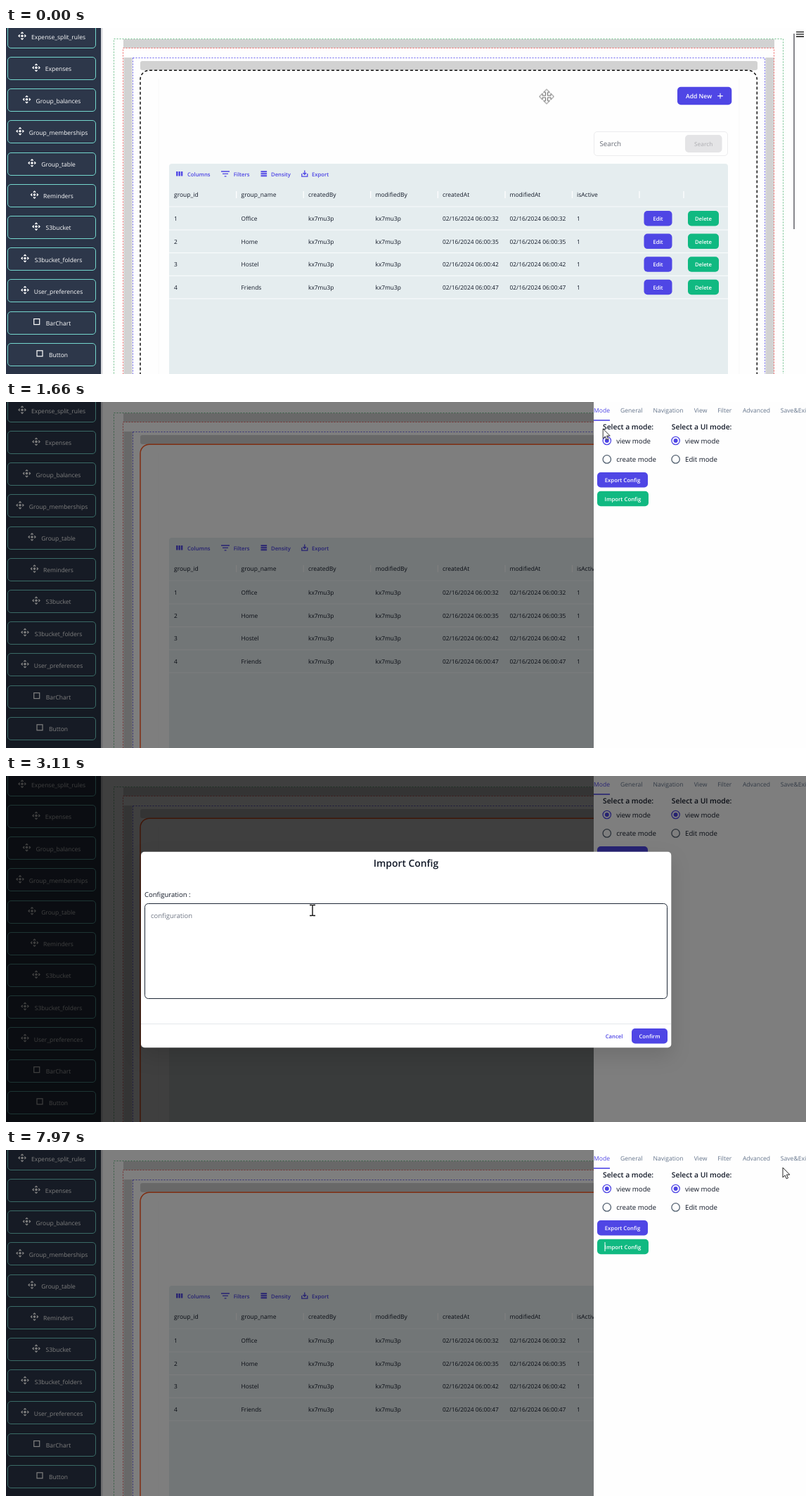
An HTML page that plays this animation: 1138x492 px, repeating every 8 s.

```html
<!DOCTYPE html>
<html lang="en">
<head>
<meta charset="utf-8">
<title>Import Config</title>
<style>
html, body { margin: 0; width: 100%; height: 100%; overflow: hidden; background: #fefefe; }
svg { display: block; width: 1138px; height: 492px; }
text { font-family: "Open Sans", "Noto Sans", sans-serif; text-rendering: geometricPrecision; }
</style>
</head>
<body>
<script>
const LOOP = 8000;
const INDIGO = '#4f46e5', GREEN = '#10b981', INK = '#111827', SLATE = '#64748b';
const EASE_OUT = 'cubic-bezier(0,0,.2,1)', EASE_IN_OUT = 'cubic-bezier(.4,0,.2,1)';

function add(parent, tag, attrs = {}) {
  const el = document.createElementNS('http://www.w3.org/2000/svg', tag);
  for (const key in attrs) el.setAttribute(key, attrs[key]);
  parent.append(el);
  return el;
}
const group = (parent, attrs) => add(parent, 'g', attrs);
const path = (parent, d, attrs) => add(parent, 'path', { d, fill: 'none', ...attrs });
const rect = (parent, x, y, width, height, attrs) =>
  add(parent, 'rect', { x, y, width, height, ...attrs });

// y is the middle of the capitals
function label(parent, x, y, string, size, attrs = {}) {
  const el = add(parent, 'text', { x, y: y + size * 0.36, 'font-size': size, fill: INK, ...attrs });
  el.textContent = string;
  return el;
}
function button(parent, x, y, w, h, string, fill, size = 7.7, color = '#fff') {
  const box = rect(parent, x, y, w, h, { rx: 5, fill });
  label(parent, x + w / 2, y + h / 2 + 0.4, string, size,
    { fill: color, 'font-weight': 600, 'text-anchor': 'middle' });
  return box;
}
// rows: [time, properties, easing towards the next row]
function play(el, rows, easing = 'linear') {
  const all = rows.concat([[LOOP, rows[rows.length - 1][1]]]);
  el.animate(all.map(([time, props, ease]) => ({ ...props, offset: time / LOOP, easing: ease || easing })),
    { duration: LOOP, iterations: Infinity });
}
const hold = (el, rows) => play(el, rows, 'steps(1)');
const at = (x, y, rest = '') => ({ transform: `translate(${x}px,${y}px) ${rest}` });

const svg = add(document.body, 'svg', { viewBox: '0 0 1138 492' });
rect(svg, 0, 0, 1138, 492, { fill: '#fefefe' });

// Sidebar
const sidebar = group(svg);
rect(sidebar, 135, 0, 2.5, 492, { fill: '#d9dade' });
rect(sidebar, 0, 0, 135, 492, { fill: '#2a3447' });
const MOVE_ICON = 'M3.54-6.46 1.77-4.7 0-6.46-1.77-4.7-3.54-6.46 0-10z';
[['Expense_split_rules', 23], ['Expenses', 43], ['Group_balances', 29.5], ['Group_memberships', 20],
 ['Group_table', 37], ['Reminders', 40.5], ['S3bucket', 43], ['S3bucket_folders', 27],
 ['User_preferences', 27], ['BarChart', 43.7], ['Button', 48]].forEach(([name, iconX], i) => {
  const y = 12.4 + i * 45.18;
  rect(sidebar, 2.5, Math.round(y - 16.5) + 0.5, 125, 32,
    { rx: 4.5, fill: '#2d374a', stroke: '#74d6cd' });
  label(sidebar, 74.5, y + 0.8, name, 8.5, { fill: '#fff', 'text-anchor': 'middle', 'font-weight': 500 });
  if (i > 8) {
    rect(sidebar, iconX - 4, y - 5.4, 8, 8, { fill: 'none', stroke: '#fff', 'stroke-width': 1.2 });
  } else {
    const icon = group(sidebar, { transform: `translate(${iconX} ${y - 1.2}) scale(.593)`, fill: '#fff' });
    for (let turn = 0; turn < 360; turn += 90)
      path(icon, MOVE_ICON, { fill: '#fff', transform: `rotate(${turn})` });
    add(icon, 'circle', { r: 3 });
  }
});

// Nested drop zones
const page = group(svg);
const zone = (x, y, w, stroke) =>
  rect(page, x, y, w, 520, { fill: 'none', stroke, 'stroke-dasharray': '2 2' });
const band = (x, y, w, h, rx = 0) => rect(page, x, y, w, h, { rx, fill: '#d2d2d2' });
band(167, 16, 926, 12.5);
band(167.5, 42, 12, 450);
band(1080.5, 42, 12, 450);
band(191, 47, 878, 13, 3);
zone(153.5, 15.5, 952, '#6fc08b');
zone(166.5, 28.5, 926, '#f06464');
zone(180.5, 42.5, 899, '#6a62ee');
path(page, 'M217 72V492M1043 72V492', { stroke: '#f8f8f8' });
const frame = rect(page, 191, 60.2, 877.3, 520, { rx: 13, fill: 'none', stroke: '#111', 'stroke-width': 1.5 });
hold(frame, [[0, { strokeDasharray: '4px, 3px' }], [780, { strokeDasharray: 'none' }]]);
play(frame, [[0, { stroke: '#111' }], [780, { stroke: '#111' }], [1200, { stroke: '#ff5a22' }]]);

button(page, 955, 83.8, 77.3, 25.4, '', INDIGO);
label(page, 967, 97, 'Add New', 8.6, { fill: '#fff', 'font-weight': 600 });
path(page, 'M1012.2 96.6h7.6M1016 92.8v7.6', { stroke: '#fff', 'stroke-width': 1.1 });
rect(page, 836.5, 147.5, 190, 34, { rx: 4.5, fill: '#fefefe', stroke: '#ececee' });
label(page, 844.5, 164.8, 'Search', 9.7, { fill: '#666b75' });
button(page, 966, 152, 52.5, 25, 'Search', '#e4e4e6', 8.2, '#b9b9bd');

// Data table
path(page, 'M232 500V197q0-4 4-4H1023q4 0 4 4V500z', { fill: '#e5edef' });
const tool = { stroke: INDIGO, 'stroke-width': 1.3 };
path(page, 'M243.3 204v6.6M246.7 204v6.6M250.1 204v6.6', { stroke: INDIGO, 'stroke-width': 2.4 });
path(page, 'M306 204h12M308 207.4h8M310.7 210.8h2.8', tool);
path(page, 'M362.5 204.3h8.6M362.5 207.3h8.6M362.5 210.3h8.6', { stroke: INDIGO, 'stroke-width': 2 });
path(page, 'M420.8 207v4.2h8V207M424.8 202.5v5.6M422.5 206l2.3 2.3 2.3-2.3', tool);
[['Columns', 258], ['Filters', 323.7], ['Density', 377], ['Export', 435]].forEach(([name, x]) =>
  label(page, x, 208, name, 7.7, { fill: INDIGO, 'font-weight': 600 }));

const columnX = i => 239 + i * 95.5;
['group_id', 'group_name', 'createdBy', 'modifiedBy', 'createdAt', 'modifiedAt', 'isActive'].forEach((name, i) =>
  label(page, columnX(i), 237, name, 8.5));
[327.7, 423.2, 518.7, 614.3, 710, 805.5, 901, 964].forEach(x =>
  path(page, `M${x} 232v10`, { stroke: '#fff', 'stroke-width': 1.2 }));
path(page, 'M232 254H1027', { stroke: '#f7fafb', 'stroke-width': 1.2 });
[['Office', 32], ['Home', 35], ['Hostel', 42], ['Friends', 47]].forEach(([name, second], i) => {
  const y = 271 + i * 32.6, stamp = '02/16/2024 06:00:' + second;
  [i + 1, name, 'kx7mu3p', 'kx7mu3p', stamp, stamp, 1].forEach((cell, c) =>
    label(page, columnX(c), y, cell, 8.4));
  button(page, 907.5, y - 11, 40, 21.5, 'Edit', INDIGO);
  button(page, 970, y - 11, 44, 21.5, 'Delete', GREEN);
  path(page, `M232 ${y + 16.1}H1027`, { stroke: '#f7fafb', 'stroke-width': 1.2 });
});
path(page, 'M1121 8V286', { stroke: '#55555c', 'stroke-width': 1.4 });
path(page, 'M1124 5.6h11M1124 8.9h11M1124 12.2h11', { stroke: '#111', 'stroke-width': 1.4 });

// Settings drawer
const drawerShade = rect(svg, 0, 0, 1138, 492);
play(drawerShade, [[0, { opacity: 0 }], [780, { opacity: 0 }], [1085, { opacity: 0.5 }]]);
const drawer = group(svg);
play(drawer, [[0, at(302, 0)], [780, at(302, 0), EASE_OUT], [1000, at(0, 0)]]);
rect(drawer, 836, 0, 310, 492, { fill: '#fefefe' });
[['Mode', 847.5], ['General', 889.7], ['Navigation', 942], ['View', 988], ['Filter', 1022.3],
 ['Advanced', 1067.5], ['Save&Exit', 1121.5]].forEach(([name, x], i) =>
  label(drawer, x, 12, name, 8.6, { fill: i ? SLATE : INDIGO, 'text-anchor': 'middle' }));
rect(drawer, 836, 25.2, 23, 1.6, { fill: INDIGO });
[[849, 'Select a mode:', 'create mode'], [946.8, 'Select a UI mode:', 'Edit mode']].forEach(([x, title, other]) => {
  label(drawer, x, 35.2, title, 10.3, { 'font-weight': 600 });
  const ring = { cx: x + 5.8, r: 5.7, fill: 'none', 'stroke-width': 1.3 };
  add(drawer, 'circle', { ...ring, cy: 55, stroke: INDIGO });
  add(drawer, 'circle', { cx: x + 5.8, cy: 55, r: 3, fill: INDIGO });
  add(drawer, 'circle', { ...ring, cy: 81.4, stroke: '#526070' });
  label(drawer, x + 19.2, 55.8, 'view mode', 9.7);
  label(drawer, x + 19.2, 82, other, 9.7);
});
button(drawer, 841, 100, 72, 21.5, 'Export Config', INDIGO, 7.8);
const importButton = button(drawer, 841, 126.7, 73, 21.5, 'Import Config', GREEN, 7.8);
hold(importButton, [[0, { fill: GREEN }], [1920, { fill: '#059669' }], [2445, { fill: GREEN }]]);

// Import dialog
const fade = [[0, 0], [2232, 0, EASE_IN_OUT], [2457, 1], [6889, 1, 'steps(1)'], [6890, 0]];
const fadeTo = (el, level) => play(el, fade.map(([time, on, ease]) => [time, { opacity: on * level }, ease]));
fadeTo(rect(svg, 0, 0, 1138, 492), 0.5);
const dialog = group(svg);
fadeTo(dialog, 1);
rect(dialog, 192, 107.7, 754.3, 278.5,
  { rx: 5, fill: '#fff', style: 'filter:drop-shadow(0 12px 14px rgba(0,0,0,.12))' });
label(dialog, 569, 124.4, 'Import Config', 13.9, { 'font-weight': 600, 'text-anchor': 'middle' });
label(dialog, 197, 168.2, 'Configuration :', 9.5);
path(dialog, 'M192 352.5H946', { stroke: '#e5e7eb' });
label(dialog, 865, 370.2, 'Cancel', 7.7, { fill: INDIGO, 'font-weight': 600, 'text-anchor': 'middle' });
const confirm = button(dialog, 890, 359, 51, 21.4, 'Confirm', INDIGO);
hold(confirm, [[0, { fill: INDIGO }], [6100, { fill: '#3730a3' }]]);

const field = rect(dialog, 197.5, 181.5, 743, 135, { rx: 5, fill: 'none' });
const edge = (stroke, strokeWidth = '1px') => ({ stroke, strokeWidth });
hold(field, [[0, edge('#e8eaed')], [2740, edge('#1f2937')], [3570, edge(INDIGO, '1.5px')], [6690, edge('#e8eaed')]]);

const notch = rect(dialog, 202.5, 179, 53, 4, { fill: '#fff' });
hold(notch, [[0, { opacity: 0 }], [3600, { opacity: 1 }]]);
const hint = label(dialog, 0, 0, 'configuration', 9.5);
play(hint, [[0, at(206, 199, 'scale(1)')], [3570, at(206, 199, 'scale(1)'), EASE_OUT],
  [3770, at(206, 181.4, 'scale(.76)')]]);
play(hint, [[0, { fill: '#717886' }], [3570, { fill: '#717886' }], [3770, { fill: INDIGO }],
  [6690, { fill: INDIGO }], [6860, { fill: SLATE }]]);

const pasted = group(dialog);
hold(pasted, [[0, { opacity: 0 }], [4320, { opacity: 1 }]]);
['"edit_button_visible1": true,', '"delete_button_visible1": true,', '"add_new_button_new_name1": "ADD NEW",',
 '"heading1_visible1": true,', '"heading2_visible1": false,', '"label_value": "separate_label",',
 '"innerContent": "Groups"', '}'].forEach((line, i) =>
  label(pasted, line === '}' ? 205.5 : 211.2, 199.2 + i * 14.55, line, 9.5));
path(pasted, 'M215 292' + 'l1.5-1.5 1.5 1.5'.repeat(19), { stroke: '#e5372f', 'stroke-width': 0.8 });
path(pasted, 'M928.6 284.5V296', { stroke: '#555', 'stroke-width': 1.4 });

// Text caret
const caret = rect(svg, 0, 0, 1, 1);
hold(caret, [
  [0, 1123, 1, 15, 0], [70, 1123, 1, 15, 1], [520, 1123, 1, 15, 0],
  [2220, 521.5, 114, 19, 0.3], [2445, 521.5, 114, 19, 1], [2770, 521.5, 114, 19, 0],
  [3570, 206, 191, 14, 1], [4120, 206, 191, 14, 0],
  [4320, 209, 293, 14, 1], [4670, 209, 293, 14, 0], [5220, 209, 293, 14, 1], [5770, 209, 293, 14, 0],
  [6290, 209, 293, 14, 1], [6690, 206, 295, 14, 1],
  [6890, 851.5, 131, 13, 1, '#fff'], [7440, 851.5, 131, 13, 0, '#fff'], [7960, 851.5, 131, 13, 1, '#fff'],
].map(([time, x, y, h, opacity, fill = '#111']) => [time, { ...at(x, y, `scale(1,${h})`), opacity, fill }]));

// Mouse pointer
const pointer = group(svg);
play(pointer, [
  [0, 769, 97.5], [780, 770, 97], [1130, 770, 97], [1260, 786, 72], [1400, 805, 30], [1540, 832, 8],
  [1750, 862, 60], [1930, 873, 125], [2080, 871, 131], [2445, 871, 131], [2600, 760, 160],
  [2760, 560, 192], [2900, 456, 188], [3040, 440, 189], [3110, 436, 191], [3330, 436, 191],
  [3450, 439, 198], [5070, 439, 198], [5200, 450, 194], [5500, 620, 230], [5810, 797, 312],
  [5950, 870, 350], [6150, 920, 375], [6290, 922, 373], [7030, 922, 373], [7300, 960, 300],
  [7600, 1060, 130], [7840, 1089, 52], [7960, 1105, 25],
].map(([time, x, y]) => [time, at(x, y)]));

const outline = { fill: '#fff', stroke: '#111', 'stroke-width': 0.9, 'stroke-linejoin': 'round' };
const shapes = {
  move: path(pointer, 'M0-10.3 4.4-6H1.4V-1.4H6V-4.4L10.3 0 6 4.4V1.4H1.4V6H4.4L0 10.3-4.4 6H-1.4V1.4H-6V4.4L-10.3 0-6-4.4V-1.4H-1.4V-6H-4.4z',
    { ...outline, stroke: '#333', 'stroke-width': 0.75 }),
  arrow: path(pointer, 'M0 0V14l3.1-3 2.1 4.8 2.3-1-2.1-4.7H9.8z', outline),
  beam: path(pointer, 'M-4-7.5h3l1 .7 1-.7h3M0-7V7M-4 7.5h3l1-.7 1 .7h3', { stroke: '#111', 'stroke-width': 1.4 }),
  hand: path(pointer, 'M-1.5.8Q0-.8 1.5.8V6q1.5-.8 2.4.5 1.5-.7 2.3.6 1.7-.3 1.8 1.4V12q0 2-1.5 5.5H-.8L-4.8 11q-.8-2 1-1.8L-1.5 11z', outline),
};
const shown = [[0, 'move'], [780, 'arrow'], [1920, 'hand'], [2220, 'arrow'], [2740, 'beam'],
  [5840, 'arrow'], [6100, 'hand'], [6890, 'arrow']];
for (const name in shapes)
  hold(shapes[name], shown.map(([time, kind]) => [time, { opacity: kind === name ? 1 : 0 }]));
</script>
</body>
</html>
```
